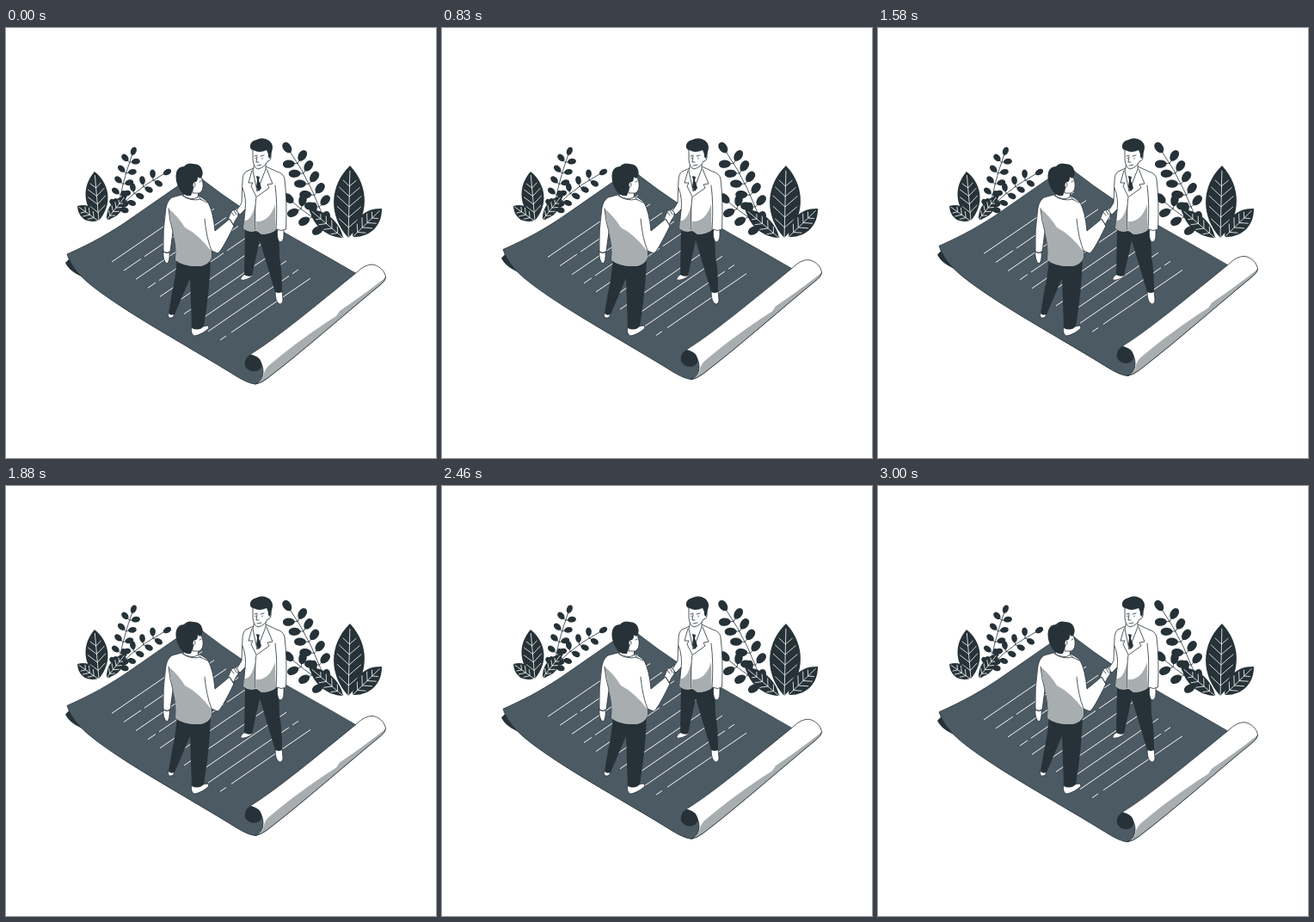
These frames come from a looping animation (500 px wide and 500 px high, 3040 ms). An HTML page:

```html
<!DOCTYPE html>
<html lang="en">
<head>
<meta charset="utf-8">
<title>Agreement</title>
<style>
  html, body { margin: 0; width: 100%; height: 100%; overflow: hidden; background: #fff; }
  svg { display: block; width: 100vw; height: 100vh; }
  .ink { fill: #263238; }
  .paper { fill: #4c5a64; stroke: #263238; stroke-width: .8; }
  .shade { fill: #a8adaf; }
  .white { fill: #fff; stroke: #263238; stroke-width: .8; stroke-linejoin: round; }
  .line { fill: none; stroke: #263238; stroke-width: .8; stroke-linecap: round; stroke-linejoin: round; }
  .vein { fill: none; stroke: #fff; stroke-width: .8; }
  .rule { fill: none; stroke: #fff; stroke-width: .95; }
</style>
</head>
<body>
<svg viewBox="0 0 500 500">
  <g id="plants"></g>

  <g id="sheet">
    <path class="ink" d="M75 267L69 273C72 280 80 286 92 291L96 289Z"/>
    <path class="paper" d="M71 263C98 251 122 238 146 221L195 187L213 175L226 174L232 179Q250 193 271 207C305 228 360 258 408 286L300 384L299 405Q296 414 289 414Q281 413 268 405C215 372 150 337 108 306C89 292 76 279 71 263Z"/>
    <g id="rules"></g>
    <path class="white" d="M284 379.500C312 363 365 319 408 284Q417 275 426 275C434 276 441 283 441.500 290C441 293 439 295 436 298C398 329 345 376 303 408Q297 413 290 414Q299 410 299 400C299 389 293 383 284 379.500Z"/>
    <path class="shade" d="M299 406Q300 398 305 393C324 377 355 353 384 335L388 329Q412 313 441.500 290Q439 295 436 298C398 329 345 376 303 408Q297 413 292 413.500Q297 410 299 406Z"/>
    <path class="ink" d="M284 380C279 382 277 388 278 393C282 400 290 401 295 397C299 393 297 387 294 384Q289 380 284 380Z"/>
    <path class="line" d="M290 414Q296 413 303 408C345 376 398 329 436 298Q440 295 441.500 290"/>
  </g>

  <g id="facing-man">
    <path class="white" d="M278 286Q272 290 273 293Q280 294 287 288L286 285ZM313 306Q313 319 318 321Q322 321 322 316L321 305Z"/>
    <path class="ink" d="M278 232L277 287Q282 290 286 288L295 247L313 307Q317 309 321 307Q321 280 318 266L317 234Z"/>
    <path class="white" d="M316 233Q314 243 318 249Q323 249 323 241V233Z"/>
    <path class="white" d="M275 205L263 214Q260 217 264 221Q268 222 270 217L279 207Z"/>
    <path class="white" d="M288 163L279 167Q275 170 275 178L274 203L268 213L272 217L278 211L276 233Q283 239 291 236L297 240Q308 240 314 235L315 234Q320 237 325.500 234Q327 200 324 176Q323 169 315 167L302 161Z"/>
    <path class="shade" d="M277 224Q285 225 290 205L290 235Q283 239 276 233ZM291 235L291 225Q306 226 313 205L313.500 235Q306 240 297 240Z"/>
    <path class="white" d="M289 157L287 166L292 190L302 164V157Z"/>
    <path class="ink" d="M291 172L295 173L294 177L297 186L294 190L291 185L292 177Z"/>
    <path class="line" d="M286 166L282 180L287 180L285 184L291 196Q289 210 290 235M303 164L310 181L304 182L306 186L292 196M313 183Q316 205 314 235M275 186Q280 198 278 212"/>
    <path class="white" d="M287 142V153Q288 163 293 164Q301 162 304 155Q309 155 308 146L300 138Z"/>
    <path class="ink" d="M284 139Q283 132 291 130Q299 126 306 131Q312 136 309 144L307 152L305 150Q305 145 303 142Q294 146 288 142Q285 142 284 139Z"/>
    <path class="line" d="M289 149L292 148M296 149L300 148M292 149L291 156L294 156M292 160L297 159M290 151V152M298 151V152"/>
  </g>

  <g id="near-man">
    <path class="white" d="M190 328Q187 335 190 337Q196 338 196 330ZM216 346Q214 356 219 358Q227 357 236 349L235 346L228 347Z"/>
    <path class="ink" d="M199 266Q197 292 193 308L189 332Q192 335 196 333L214 291L216 349Q224 353 230 347Q237 305 238 266Z"/>
    <path class="white" d="M183 259Q182 270 187 274Q191 272 190 259Z"/>
    <path class="white" d="M262 213L266 211L270 214Q271 219 267 223L264 229L258 223Z"/>
    <path class="white" d="M204 194L193 197Q188 200 186 209Q182 235 183 260Q187 263 191 260L194 237Q199 255 197 270Q207 278 226 277Q236 275 239 267L239 259L246 262Q250 261 265 230L260 222L243 236Q241 214 235 203Q231 198 219 193Z"/>
    <path class="shade" d="M189 210Q200 219 208 232Q224 240 239 260L239 267Q236 275 226 277Q207 278 197 270Q199 255 194 237Z"/>
    <path class="line" d="M189 210Q190 224 194 237M231 222Q233 244 239 259M205 195Q215 202 226 199L234 203M222 194L227 200"/>
    <path class="white" d="M210 185L206 195Q215 201 223 197L224 190Z"/>
    <path class="white" d="M217 173L227 173L229 180Q230 189 225 192L217 192Z"/>
    <path class="ink" d="M202 188Q196 178 198 168Q200 161 207 161Q211 156 218 158Q226 158 228 165Q230 171 226 175L223 173Q223 180 219 179Q216 181 218 186L215 195Q206 196 202 188Z"/>
    <path class="line" d="M217 180Q220 178 220 183Q218 187 217 185M225 179L227 178"/>
    <path class="line" d="M262 214L265 218M265 212L268 217M183 260Q187 263 191 260M260 222L265 230"/>
  </g>
</svg>

<script>
const LOOP = 3040, LIFT = 10;
const byId = id => document.getElementById(id);
const plants = byId('plants'), sheet = byId('sheet'), rules = byId('rules');

function addPath(parent, cls, d) {
  const el = document.createElementNS('http://www.w3.org/2000/svg', 'path');
  el.setAttribute('class', cls);
  el.setAttribute('d', d);
  parent.append(el);
}

// Maps distance along and across an axis to stage coordinates.
function axis(x, y, angle) {
  const c = Math.cos(angle), s = Math.sin(angle);
  return (u, v) => `${(x + u * c - v * s).toFixed(1)} ${(y + u * s + v * c).toFixed(1)} `;
}

function blade(p, from, len, half) {
  const a = from + len * .3, b = from + len * .72;
  return `M${p(from, 0)}C${p(a, half * 1.35)}${p(b, half * 1.3)}${p(from + len, 0)}` +
         `C${p(b, -half * 1.3)}${p(a, -half * 1.35)}${p(from, 0)}Z`;
}

function leaflet(p, from, len) {
  const half = len * .44, a = from + len * .1, b = from + len;
  return `M${p(from, 0)}C${p(a, half)}${p(b, half)}${p(b, 0)}C${p(b, -half)}${p(a, -half)}${p(from, 0)}Z`;
}

function bigLeaf(x, y, tipX, tipY, half, veins) {
  const len = Math.hypot(tipX - x, tipY - y);
  const p = axis(x, y, Math.atan2(tipY - y, tipX - x));
  addPath(plants, 'ink', blade(p, 0, len, half));
  let d = `M${p(-2, 0)}L${p(len * .93, 0)}`;
  for (let i = 1; i <= veins; i++) {
    const u = len * i / (veins + 2);
    const reach = half * .8 * Math.sin(Math.PI * (.15 + .8 * i / (veins + 1)));
    for (const side of [-1, 1]) d += `M${p(u, 0)}L${p(u + reach * .9, side * reach)}`;
  }
  addPath(plants, 'vein', d);
}

// Leaflet pairs spread from first to last along a curved stem, plus one at its tip.
function sprig([x0, y0], [x1, y1], [x2, y2], pairs, len, first, last) {
  addPath(plants, 'line', `M${x0} ${y0}Q${x1} ${y1} ${x2} ${y2}`);
  for (let i = 0; i <= pairs; i++) {
    const tip = i === pairs;
    const t = tip ? 1 : first + (last - first) * i / (pairs - 1), k = 1 - t;
    const x = k * k * x0 + 2 * k * t * x1 + t * t * x2;
    const y = k * k * y0 + 2 * k * t * y1 + t * t * y2;
    const heading = Math.atan2(k * (y1 - y0) + t * (y2 - y1), k * (x1 - x0) + t * (x2 - x1));
    const stalk = tip ? 0 : len * .23;
    for (const turn of tip ? [0] : [-1.1, 1.1]) {
      const p = axis(x, y, heading + turn);
      addPath(plants, 'line', `M${p(0, 0)}L${p(stalk + 2, 0)}`);
      addPath(plants, 'ink', leaflet(p, stalk, len));
    }
  }
}

sprig([129, 218], [134, 182], [146.5, 148], 5, 10, .15, .88);
sprig([120, 223], [142, 192], [183, 170], 5, 10, .22, .85);
bigLeaf(108, 224, 103, 167, 13, 4);
bigLeaf(107, 224, 83, 207, 8, 3);
bigLeaf(117, 223, 139, 195, 7, 4);

sprig([375, 238], [357, 182], [331, 145], 5, 14, .28, .84);
sprig([392, 243], [352, 219], [334, 203], 3, 14, .28, .78);
bigLeaf(398, 244, 400, 160, 18, 5);
bigLeaf(392, 244, 353, 211, 9, 4);
bigLeaf(403, 243, 437, 210, 11, 4);

// Ten text rules, some broken by a gap [from, to] along their length.
const gaps = { 1: [20, 24], 3: [9, 13], 4: [74, 78], 7: [88, 92], 8: [94, 98], 9: [7, 13] };
for (let i = 0; i < 10; i++) {
  const at = u => `${123 + 14 * i + u} ${(272 + 10.1 * i - u * .685).toFixed(1)}`;
  const [a, b] = gaps[i] || [50, 50];
  addPath(rules, 'rule', `M${at(0)}L${at(a)}M${at(b)}L${at(105)}`);
}

function draw(now) {
  const phase = now % LOOP / LOOP;
  const lift = LIFT * (1 - Math.abs(1 - 2 * phase));
  sheet.setAttribute('transform', `translate(0 ${-lift.toFixed(3)})`);
}

const start = performance.now();
function tick() {
  draw(performance.now() - start);
  requestAnimationFrame(tick);
}
tick();
</script>
</body>
</html>
```
